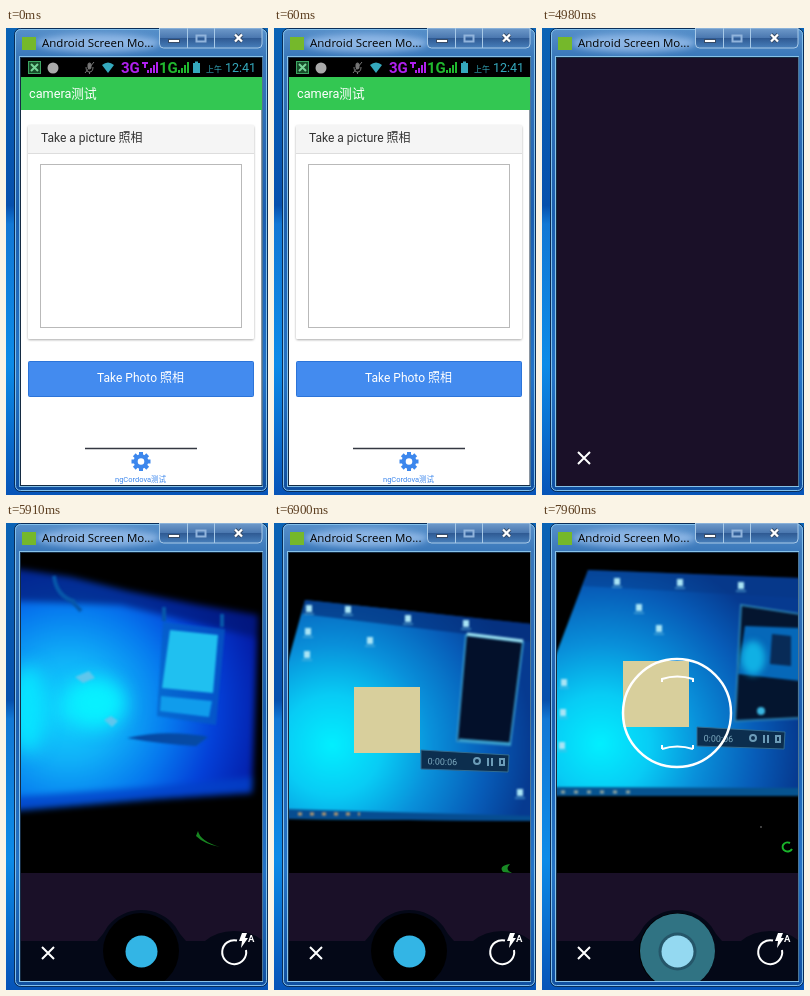
Write an HTML page that moves like this. It is 262 by 467 pixels and loops after 8 s.

```html
<!DOCTYPE html>
<html lang="zh">
<head>
<meta charset="utf-8">
<title>Camera test</title>
<style>
html, body { margin: 0; width: 100%; height: 100%; overflow: hidden; background: #0b55b0; }
svg { display: block; width: 100%; height: 100%; }
text { font-family: Roboto, "Noto Sans CJK SC", "Noto Sans CJK", sans-serif; }
.title { font: 11.5px "Open Sans", sans-serif; }
.line { fill: none; stroke: #fff; stroke-width: 2; }
.soft { filter: blur(1px); }
.softer { filter: blur(3px); }
.haze { filter: blur(9px); }

/* Each layer appears at its time and covers the ones below until the loop ends. */
.layer { visibility: hidden; animation: 8s step-end infinite; }
.boot { animation-name: boot; }
.cover { animation-name: cover; }
.camera { animation-name: camera; }
.sharpen { animation-name: sharpen; }
.steady { animation-name: steady; }
.focus { animation-name: focus; }
@keyframes boot { 61.5%, 100% { visibility: visible; } }
@keyframes cover { 62.25%, 100% { visibility: visible; } }
@keyframes camera { 73.875%, 100% { visibility: visible; } }
@keyframes sharpen { 74.625%, 100% { visibility: visible; } }
@keyframes steady { 86.25%, 100% { visibility: visible; } }
@keyframes focus { 99.5%, 100% { visibility: visible; } }
</style>
</head>
<body>
<svg viewBox="0 0 262 467" preserveAspectRatio="none">
<defs>
  <linearGradient id="desktop" x2="0" y2="1">
    <stop stop-color="#0a63b5"/><stop offset=".38" stop-color="#0650ad"/>
    <stop offset=".42" stop-color="#1278d5"/><stop offset=".72" stop-color="#0c8be8"/>
    <stop offset="1" stop-color="#0754b8"/>
  </linearGradient>
  <linearGradient id="frame" x2="0" y2="1">
    <stop stop-color="#5790ca"/><stop offset=".06" stop-color="#3a78ba"/>
    <stop offset=".4" stop-color="#1b5eae"/><stop offset=".75" stop-color="#2473c6"/>
    <stop offset="1" stop-color="#104f9f"/>
  </linearGradient>
  <linearGradient id="buttons" x2="0" y2="1">
    <stop stop-color="#6f9bcb"/><stop offset=".48" stop-color="#4b78b0"/>
    <stop offset=".5" stop-color="#2e5992"/><stop offset="1" stop-color="#477fbb"/>
  </linearGradient>
  <radialGradient id="glow" gradientUnits="userSpaceOnUse" cx="62" cy="186" r="205">
    <stop stop-color="#10d8ff"/><stop offset=".25" stop-color="#10b0f8"/>
    <stop offset=".5" stop-color="#0678ee"/><stop offset=".72" stop-color="#0440d8"/>
    <stop offset="1" stop-color="#0418a0"/>
  </radialGradient>
  <radialGradient id="wallpaper" gradientUnits="userSpaceOnUse" cx="58" cy="222" r="200">
    <stop stop-color="#02efff"/><stop offset=".25" stop-color="#08ccf5"/>
    <stop offset=".5" stop-color="#0990da"/><stop offset=".78" stop-color="#075cb8"/>
    <stop offset="1" stop-color="#063a90"/>
  </radialGradient>
  <clipPath id="client"><rect x="15" y="30" width="241" height="428"/></clipPath>
  <clipPath id="preview"><rect x="15" y="30" width="241" height="320"/></clipPath>
  <path id="cross" class="line" d="M-6-6 6 6M6-6-6 6"/>
  <path id="bars" d="M0 11V8h2v3zM3 11V6h2v5zM6 11V3h2v8zM9 11V0h2v11z"/>
  <rect id="tooth" x="-2" y="-9.5" width="4" height="5"/>
  <g id="clock" fill="#35a9bd">
    <path d="M187 35h2v-1.500h3v1.500h2v10h-7z"/>
    <text x="200" y="43.500" font-size="8">上午</text>
    <text x="219" y="44" font-size="12.500">12:41</text>
  </g>
  <g id="icon"><rect x="-3" y="-4" width="6" height="7" fill="#a9e4f5"/><path d="M-5 5H5" stroke="#65b9df"/></g>
  <g id="recorder">
    <path d="M0 0 88 5 87 22 0 19z" fill="#0c2e4e" stroke="#326c91"/>
    <text x="7" y="14" font-size="9" fill="#7eabc0" transform="rotate(2)">0:00:06</text>
    <g fill="none" stroke="#6c9cb8" stroke-width="2"><circle cx="56" cy="11" r="3"/><path d="M67 8v8M71 8v8M79 9h4v6h-4z"/></g>
  </g>
  <g id="view">
    <rect x="15" y="30" width="241" height="320"/>
    <g class="soft">
      <path d="M31 77 258 101V298L10 296V153z" fill="url(#wallpaper)"/>
      <path d="M31 77 258 101V119L28 91z" fill="#062d79" opacity=".65"/>
      <path d="M10 286 258 293V298L10 296z" fill="#064d91"/>
      <path d="M24 291h62" stroke="#b8996d" stroke-width="3" stroke-dasharray="4 8"/>
      <path d="M192 112 249 119 236 222 183 218z" fill="#03102a" stroke="#318fc5" stroke-width="2"/>
      <path d="M193 111 249 118" stroke="#9ce1f1" stroke-width="3"/>
      <path d="M185 217 237 221" stroke="#399fcd" stroke-width="3"/>
      <use href="#icon" x="35" y="86"/><use href="#icon" x="74" y="87"/>
      <use href="#icon" x="134" y="96"/><use href="#icon" x="192" y="101"/>
      <use href="#icon" x="34" y="109"/><use href="#icon" x="96" y="118"/>
      <use href="#icon" x="33" y="132"/><use href="#icon" x="246" y="270"/>
    </g>
    <rect x="80" y="164" width="66" height="66" fill="#d8cf9c"/>
    <use href="#recorder" x="147" y="227"/>
  </g>
</defs>

<!-- Window -->
<rect width="262" height="467" fill="url(#desktop)"/>
<rect x="8.500" y=".5" width="253" height="463" rx="6" fill="url(#frame)" stroke="#092d58"/>
<rect x="9.500" y="1.500" width="251" height="461" rx="5" fill="none" stroke="#82c0ec"/>
<ellipse cx="92" cy="15" rx="62" ry="9" fill="#a3c6f0" opacity=".75" class="softer"/>
<rect x="16" y="9" width="14" height="13" fill="#75b82b"/>
<text class="title" x="36" y="19">Android Screen Mo...</text>
<path d="M153.500 0V16q0 4 4 4H252q4 0 4-4V0z" fill="url(#buttons)" stroke="#a7c9e7"/>
<path d="M181.500 0V20M208.500 0V20" stroke="#a7c9e7"/>
<rect x="162.500" y="11.500" width="11" height="3" fill="#fff" stroke="#384c67"/>
<rect x="190.500" y="7.500" width="9" height="6" fill="none" stroke="#91b4dc" stroke-width="2"/>
<path d="M229 6.500 236 13.500M236 6.500 229 13.500" stroke="#384c67" stroke-width="4"/>
<path d="M229 6.500 236 13.500M236 6.500 229 13.500" stroke="#fff" stroke-width="2.300"/>
<rect x="13.500" y="28.500" width="243" height="430" fill="#fff" stroke="#87c2e8"/>
<rect x="14.500" y="29.500" width="241.500" height="428" fill="#fff" stroke="#142b43"/>

<g clip-path="url(#client)">
  <!-- Test page -->
  <rect x="15" y="30" width="241" height="19"/>
  <rect x="22.500" y="33.500" width="12" height="12" fill="#174d29" stroke="#3ca763"/>
  <path d="M25 36 32 43M32 36 25 43" stroke="#78d49a" stroke-width="2"/>
  <circle cx="47" cy="40" r="5.500" fill="#aaa"/>
  <g stroke="#777" fill="#777"><rect x="82" y="35" width="3" height="6" rx="1.500"/><path d="M80 39q0 5 3.500 5T87 39M83.500 44v2M79 45 88 34" fill="none"/></g>
  <path d="M96 37q6-5 12 0l-6 8z" fill="#35a9bd"/>
  <g font-size="15" font-weight="700">
    <text x="115" y="45" fill="#b020ef">3G</text><text x="153" y="45" fill="#20b92f">1G</text>
  </g>
  <path d="M136 35h6M139 35v5" stroke="#b020ef" stroke-width="2"/>
  <use href="#bars" x="141" y="34" fill="#b020ef"/>
  <use href="#bars" x="172" y="34" fill="#20b92f"/>
  <use href="#clock"/>
  <rect x="15" y="49" width="241" height="33" fill="#33c752"/>
  <text x="23" y="70" font-size="12.700" fill="#fff">camera测试</text>
  <rect x="22" y="98" width="226" height="214" rx="2" fill="#aaa" class="soft"/>
  <rect x="22" y="97" width="226" height="214" rx="1" fill="#fff"/>
  <path d="M22 97H248V125H22z" fill="#f5f5f5"/>
  <path d="M22 125.500H248" stroke="#ddd"/>
  <text x="35" y="114" font-size="12" fill="#333">Take a picture 照相</text>
  <rect x="34.500" y="136.500" width="201" height="163" fill="#fff" stroke="#b9b9b9"/>
  <rect x="22.500" y="333.500" width="225" height="35" rx="1" fill="#438bef" stroke="#2c74d9"/>
  <text x="91" y="354" font-size="12" fill="#fff">Take Photo 照相</text>
  <path d="M79 420.500H191" stroke="#343842" stroke-width="1.300"/>
  <g transform="translate(135 433.500)" fill="#3c87ed">
    <circle r="5.300" fill="none" stroke="#3c87ed" stroke-width="4"/>
    <use href="#tooth"/><use href="#tooth" transform="rotate(45)"/><use href="#tooth" transform="rotate(90)"/><use href="#tooth" transform="rotate(135)"/>
    <use href="#tooth" transform="rotate(180)"/><use href="#tooth" transform="rotate(225)"/><use href="#tooth" transform="rotate(270)"/><use href="#tooth" transform="rotate(315)"/>
  </g>
  <text x="109" y="453.500" font-size="7.500" fill="#3c87ed">ngCordova测试</text>

  <!-- Camera opening -->
  <g class="layer boot">
    <rect x="15" y="30" width="241" height="17"/>
    <rect x="15" y="47" width="241" height="411" fill="#1a1028"/>
    <g fill="#101727">
      <circle cx="28" cy="38" r="5"/><path d="M42 34 51 42M51 34 42 42" stroke="#141b2b" stroke-width="2"/>
      <rect x="59" y="35" width="12" height="6" rx="2"/><path d="M82 34h3v8h-3zM95 36q6-5 12 0l-6 7z"/>
      <text x="115" y="43" font-size="15" font-weight="700">3G</text><use href="#bars" x="139" y="32"/>
    </g>
    <use href="#clock" y="-2"/>
    <use href="#cross" x="42" y="429"/>
  </g>
  <g class="layer cover">
    <rect x="15" y="30" width="241" height="428" fill="#1a1028"/>
    <use href="#cross" x="42" y="430"/>
  </g>

  <!-- Live picture -->
  <g clip-path="url(#preview)">
    <g class="layer camera">
      <rect x="15" y="30" width="241" height="320"/>
      <g class="softer">
        <path d="M5 45 65 54 122 68 190 82 252 92 246 270 150 276 5 288z" fill="url(#glow)"/>
        <path d="M5 45 65 54 122 68 252 92 251 115 115 82 5 78z" fill="#02146c" opacity=".65"/>
        <path d="M5 274 145 264 247 254 246 270 150 276 5 288z" fill="#0342c9" opacity=".8"/>
      </g>
      <ellipse cx="90" cy="180" rx="30" ry="25" fill="#08f0ff" class="haze"/>
      <ellipse cx="22" cy="186" rx="18" ry="43" fill="#08e4ff" class="haze"/>
      <g class="soft">
        <path d="M157 99 219 106 210 202 151 193z" fill="#075fc4" opacity=".7"/>
        <path d="M164 107 212 112 207 170 156 165z" fill="#20c0f0"/>
        <path d="M155 173 206 178 203 194 154 188z" fill="#109cec"/>
        <path d="M121 215Q160 206 202 214L190 223Q155 221 121 215z" fill="#064aa4"/>
        <path d="M48 53Q50 73 69 79M65 77 75 88M158 84V98M216 91V104" fill="none" stroke="#0757a9" stroke-width="4"/>
        <path d="M69 154 83 148 89 155 77 160zM98 197l7-4 7 5-6 6z" fill="#60c6ec"/>
      </g>
      <path d="M192 308Q194 318 214 324Q198 321 190 313z" fill="#188721"/>
    </g>
    <g class="layer sharpen"><g class="soft"><use href="#view"/></g></g>
    <g class="layer steady">
      <use href="#view"/>
      <path d="M236 341q-12 2-7 8l9 1q-8-3-2-9" fill="#198a25"/>
    </g>
    <g class="layer focus">
      <rect x="15" y="30" width="241" height="320"/>
      <g class="soft">
        <path d="M46 48 258 56V273L10 274V143z" fill="url(#wallpaper)" transform="translate(0 -1)"/>
        <path d="M46 47 258 55V75L41 63z" fill="#063681" opacity=".4"/>
        <path d="M10 264 258 265V273H10z" fill="#06538f"/>
        <path d="M19 269h78" stroke="#93a69e" stroke-width="3" stroke-dasharray="4 9"/>
        <path d="M199 82 258 91V195L193 198z" fill="#04152f" stroke="#287cae" stroke-width="2"/>
        <path d="M203 103 258 105V158L196 151z" fill="#0668b9"/>
        <ellipse cx="211" cy="135" rx="12" ry="17" fill="#10b0e4" class="softer"/>
        <path d="M230 111 249 113V143L228 141z" fill="#082b57"/>
        <circle cx="219" cy="188" r="4" fill="#39b4df"/>
        <use href="#icon" x="75" y="59"/><use href="#icon" x="138" y="60"/>
        <use href="#icon" x="199" y="63"/><use href="#icon" x="97" y="85"/>
        <use href="#icon" x="117" y="106"/><use href="#icon" x="22" y="160"/>
        <use href="#icon" x="21" y="190"/><use href="#icon" x="20" y="223"/>
      </g>
      <rect x="81" y="138" width="66" height="66" fill="#d8cf9c"/>
      <use href="#recorder" x="155" y="204"/>
      <path d="M248 320a5 4.500 0 1 0 2 6" fill="none" stroke="#19b52b" stroke-width="2"/>
      <circle cx="219" cy="304" r="1" fill="#555"/>
      <g class="line"><circle cx="135" cy="190" r="54" stroke-width="2.500"/><path d="M120 159V156Q135 151 151 156V159M120 222V226M151 222V226M120 226Q135 221 151 226"/></g>
    </g>
  </g>

  <!-- Camera controls -->
  <g class="layer camera">
    <rect x="15" y="350" width="241" height="108" fill="#1a1028"/>
    <path d="M15 418H91Q97 412 102 403A43 43 0 0 1 169 403Q174 412 180 418H199Q211 408 228 408T256 417V458H15z" fill="#040817"/>
    <circle cx="135" cy="428" r="38" fill="#000"/>
    <circle cx="135.500" cy="428.500" r="16" fill="#33b5e5"/>
    <use href="#cross" x="42" y="430"/>
    <path class="line" d="M231 417.500A12 12 0 1 0 240 427"/>
    <path d="M236 410H241L239 415H242L235 425 236 418H233z" fill="#fff"/>
    <text x="242" y="419" font-size="9.500" font-weight="700" fill="#fff">A</text>
  </g>
  <g class="layer focus">
    <circle cx="135.500" cy="428" r="37.500" fill="#307383"/>
    <circle cx="135.500" cy="428.500" r="19" fill="#255669"/>
    <circle cx="135.500" cy="428.500" r="16" fill="#94d9f1"/>
  </g>
</g>
</svg>
</body>
</html>
```
